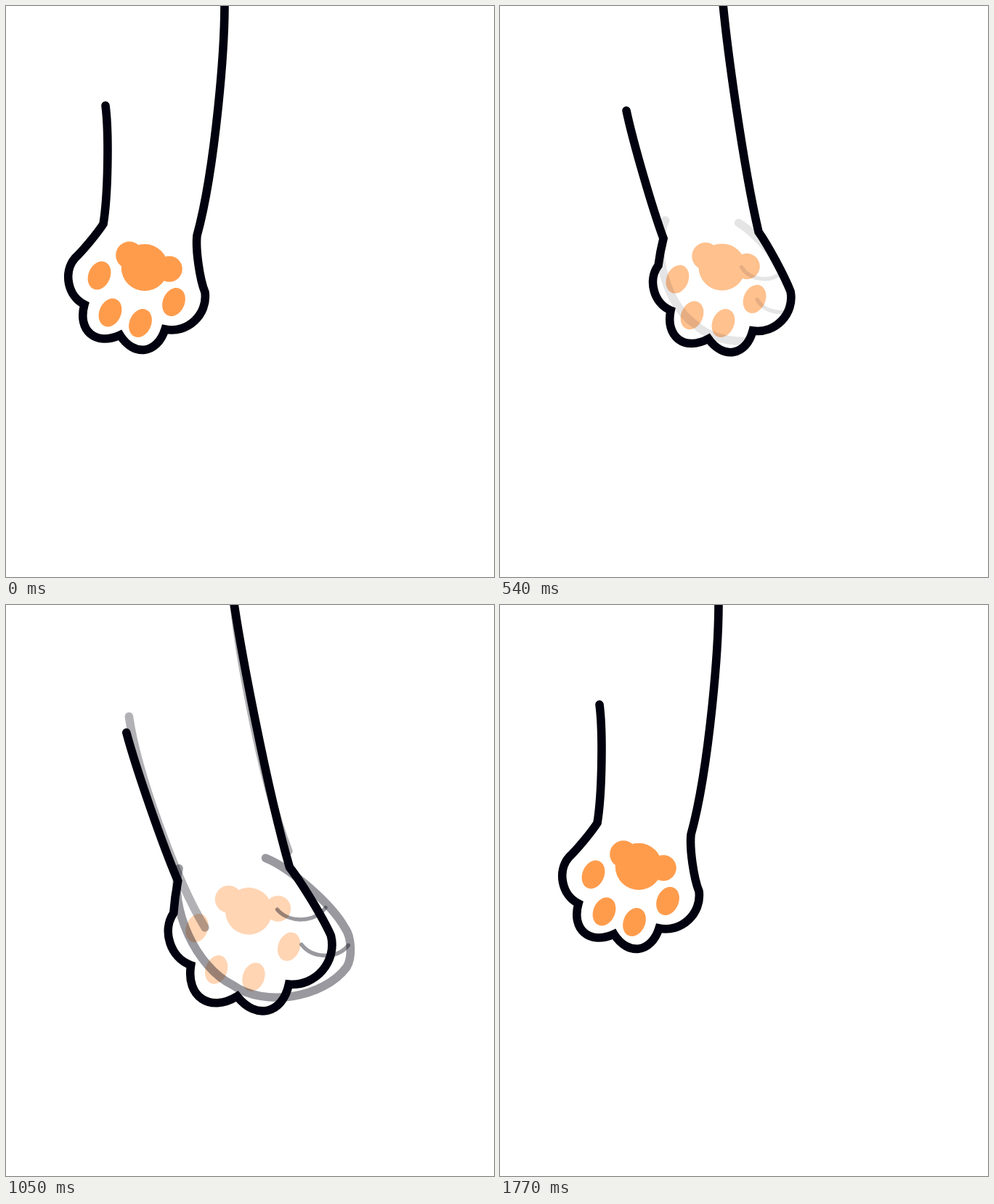
An HTML page with a canvas for the animation above (1800 ms loop, 672 by 786 pixels).

```html
<!DOCTYPE html>
<html lang="en">
<head>
<meta charset="utf-8">
<title>Swinging paw</title>
<style>
html, body { margin: 0; width: 100%; height: 100%; overflow: hidden; background: #fff; }
canvas { display: block; }
</style>
</head>
<body>
<canvas id="stage" width="672" height="786"></canvas>
<script>
const ctx = document.getElementById('stage').getContext('2d');
const INK = '#01010f', LINE = 11.6, CREASE = 5.4;
const CYCLE = 900, STEP = 30, OUT = 300, BACK = 440;
const OPEN_ANGLE = 18, FIST_ANGLE = 42;
const SHOULDER = [270, 0], THUMB = [445, 249];

// Corners of the open paw: elbow, wrist, knuckle, three gaps, heel, wrist, elbow
const PAW_REST = [[137, 137], [134, 300], [95, 347], [108, 411], [157, 453],
  [219, 445], [274, 394], [263, 316], [300, -40]];
const PAW_MID = [[174, 144], [225, 320], [218, 357], [235, 419], [287, 458],
  [348, 447], [400, 393], [356, 311], [304, -40]];
const TOE_BULGES = [0.31, 0.52, 0.52, 0.34];

const PALM = [[191, 360, 32.3], [170, 343, 18.8], [225, 362, 17.8]];
const TOE_PADS = [[128.5, 371], [143.5, 422], [185, 436.5], [231, 407.5]];

const LOWER_ARM = [[237, 152], [408, 350]];
const UPPER_ARM = [[283, -60], [467, 232]];
const FIST = [[408, 350], [566, 356], [610, 221], [566, 201], THUMB];
const CREASES = [[[533, 211], [508, 265]], [[587, 207], [560, 258]]];

const clamp = v => Math.max(0, Math.min(1, v));
const mix = (a, b, k) => a + (b - a) * k;
const ease = x => (1 - Math.cos(Math.PI * clamp(x))) / 2;
const rad = deg => deg * Math.PI / 180;

function turn([x, y], [cx, cy], deg, scale) {
  const c = Math.cos(rad(deg)) * scale, s = Math.sin(rad(deg)) * scale;
  return [cx + (x - cx) * c - (y - cy) * s, cy + (x - cx) * s + (y - cy) * c];
}

// Joins points by arcs; each bulge is relative to the distance it spans
function bow(points, bulges) {
  const path = new Path2D(), inset = 0.24;
  path.moveTo(...points[0]);
  bulges.forEach((h, i) => {
    const [x0, y0] = points[i], [x1, y1] = points[i + 1];
    const dx = x1 - x0, dy = y1 - y0;
    path.bezierCurveTo(
      x0 + dx * inset - dy * h, y0 + dy * inset + dx * h,
      x1 - dx * inset - dy * h, y1 - dy * inset + dx * h, x1, y1);
  });
  return path;
}

function stroke(path, width, alpha) {
  ctx.globalAlpha = alpha;
  ctx.lineWidth = width;
  ctx.stroke(path);
  ctx.globalAlpha = 1;
}

function drawPads(u, over, map, tint) {
  const pad = (x, y, rx, ry, tilt) => {
    // Pads slide sideways with the arm and lean a little
    const sx = x + u * (113 + 0.1 * (y - 343)), sy = y + u * 0.09 * (185 - x);
    ctx.beginPath();
    ctx.ellipse(...map([sx, sy]), rx, ry, rad(tilt - over), 0, 7);
    ctx.fill();
  };
  ctx.fillStyle = `rgb(255,${255 - 99 * tint},${255 - 179 * tint})`;
  for (const [x, y, r] of PALM) pad(x, y, r, r, 0);
  for (const [x, y] of TOE_PADS) pad(x, y, 15, 20.2, 23);
}

function drawPaw(angle, stretch) {
  const u = Math.min(1, angle / OPEN_ANGLE);
  const over = Math.max(0, angle - OPEN_ANGLE);
  const map = p => turn(p, SHOULDER, -over, stretch);
  const corners = PAW_REST.map(([x, y], i) =>
    map([mix(x, PAW_MID[i][0], u), mix(y, PAW_MID[i][1], u)]));
  const flex = 1 - 1.5 * u;
  const path = bow(corners,
    [-0.035 * flex, -0.03 * flex, ...TOE_BULGES, -0.06 * flex, 0.04 * flex]);
  const tint = clamp((27 - angle) / 14.3);
  if (tint) drawPads(u, over, map, tint);
  ctx.lineJoin = 'miter';
  stroke(path, LINE, clamp((28 - angle) / 6));
  return path;
}

function drawFist(angle, stretch, paw) {
  const alpha = clamp((angle - 17) / 10);
  const armAlpha = alpha * clamp((angle - OPEN_ANGLE) / 4);
  const bend = FIST_ANGLE - angle;
  const arm = p => turn(p, SHOULDER, bend, stretch);
  const hand = p => arm(turn(p, THUMB, 2 * bend, 1 - 0.0025 * bend));
  ctx.save();
  if (angle < 20) ctx.clip(paw);
  ctx.lineJoin = 'round';
  stroke(bow(LOWER_ARM.map(arm), [0.05]), LINE, armAlpha);
  stroke(bow(UPPER_ARM.map(arm), [0.042]), LINE, armAlpha);
  stroke(bow(FIST.map(hand), [0.2, 0.235, 0.16, 0.085]), LINE, alpha);
  for (const crease of CREASES) stroke(bow(crease.map(hand), [-0.3]), CREASE, alpha);
  ctx.restore();
}

function draw(now) {
  const t = Math.floor(now / STEP) * STEP % CYCLE;
  const angle = FIST_ANGLE * (ease(t / OUT) - ease((t - OUT) / BACK));
  const stretch = 1 + 0.18 * Math.sin(Math.PI * clamp(t / OUT)) ** 2;
  ctx.fillStyle = '#fff';
  ctx.fillRect(0, 0, 672, 786);
  ctx.strokeStyle = INK;
  ctx.lineCap = 'round';
  drawFist(angle, stretch, drawPaw(angle, stretch));
}

const start = performance.now();
function tick() {
  draw(performance.now() - start);
  requestAnimationFrame(tick);
}
tick();
</script>
</body>
</html>
```
